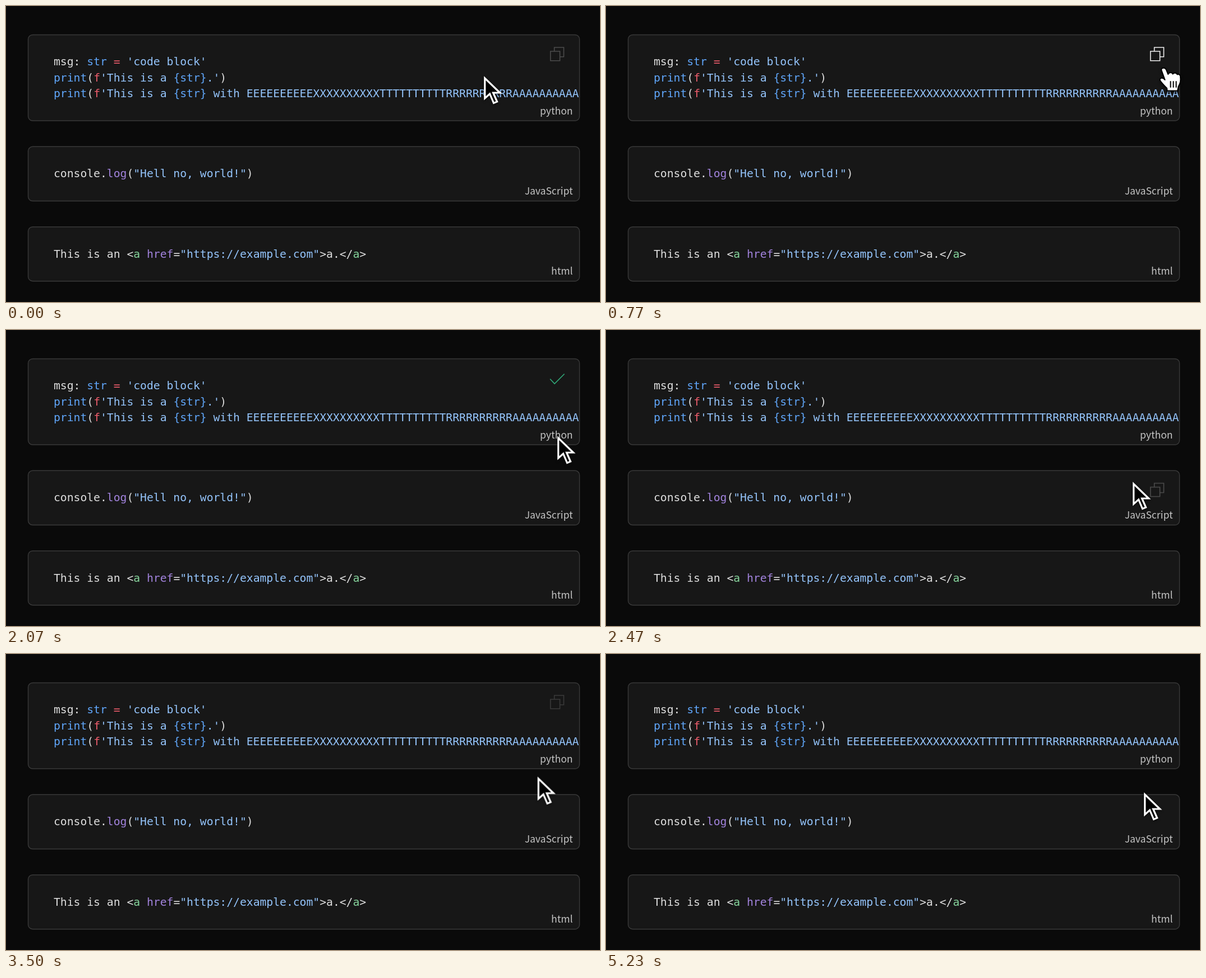
These frames come from a looping animation (1059x529 px, 5260 ms). An HTML page:

```html
<!DOCTYPE html>
<html lang="en">
<head>
<meta charset="utf-8">
<title>Code blocks with copy buttons</title>
<style>
  html, body { margin: 0; width: 100%; height: 100%; overflow: hidden; background: #0a0a0a; }
  svg { display: block; width: 1059px; height: 529px; }

  .block { fill: #171717; stroke: #393939; stroke-width: 1.4; }
  .code { font: 19.7px "DejaVu Sans Mono", monospace; fill: #dedede; white-space: pre; }
  .lang { font: 300 17.5px "Noto Sans CJK JP", "Noto Sans CJK", "Noto Sans", sans-serif; fill: #c4c4c4; text-anchor: end; }
  .fn { fill: #60a6fa; }
  .kw { fill: #ee5d6c; }
  .str { fill: #94c4fb; }
  .attr { fill: #a283dd; }
  .tag { fill: #86d49c; }

  .icon { fill: none; stroke: #4c4c4c; stroke-width: 1.6; }
  .check { stroke: #30a878; }
  .arrow { fill: #000; stroke: #fff; stroke-width: 3.2; }
  .hand { fill: #fff; stroke: #000; stroke-width: 2; stroke-linejoin: round; stroke-linecap: round; }
  .cursor { filter: drop-shadow(0 2px 2px rgba(0, 0, 0, .5)); }

  .cursor, .arrow, .hand, .copy1, .copy2, .check { animation: 5260ms linear infinite; }
  .cursor { animation-name: move; }
  .arrow { animation-name: arrow; }
  .hand { animation-name: hand; }
  .copy1 { animation-name: copy1, hover; }
  .copy2 { animation-name: copy2; }
  .check { animation-name: check; }

  @keyframes move {
    0%, 1.5% { transform: translate(852px, 125px); animation-timing-function: ease-in-out; }
    12%, 33.8% { transform: translate(993px, 110px); animation-timing-function: ease-in; }
    40.3% { transform: translate(980px, 212px); animation-timing-function: ease-out; }
    46.6%, 48.4% { transform: translate(939px, 271px); animation-timing-function: ease-in-out; }
    56.8%, 60.5% { transform: translate(905px, 114px); animation-timing-function: ease-in-out; }
    69.4%, 100% { transform: translate(959px, 247px); }
  }
  @keyframes arrow {
    0%, 11.2% { opacity: 1; }
    11.21%, 34.4% { opacity: 0; }
    34.41%, 100% { opacity: 1; }
  }
  @keyframes hand {
    0%, 11.2% { opacity: 0; }
    11.21%, 34.4% { opacity: 1; }
    34.41%, 100% { opacity: 0; }
  }
  @keyframes hover {
    0%, 11.2% { stroke: #4c4c4c; }
    13.6%, 34.4% { stroke: #ededed; }
    36.5%, 100% { stroke: #4c4c4c; }
  }
  @keyframes copy1 {
    0%, 23.8% { opacity: 1; }
    23.81%, 60.6% { opacity: 0; }
    60.61%, 65.6% { opacity: 1; }
    68.4%, 100% { opacity: 0; }
  }
  @keyframes check {
    0%, 23.8% { opacity: 0; }
    23.81%, 40.9% { opacity: 1; }
    43.7%, 51.7% { opacity: 0; }
    54.5%, 60.6% { opacity: 1; }
    60.61%, 100% { opacity: 0; }
  }
  @keyframes copy2 {
    0%, 43.7% { opacity: 0; }
    46.2%, 50.2% { opacity: 1; }
    53%, 100% { opacity: 0; }
  }
</style>
</head>
<body>
<svg viewBox="0 0 1059 529">
  <defs>
    <path id="copy" d="M970.7 81H987.5V97.8H970.7ZM977.6 81V74H994.4V90.8H987.5"/>
  </defs>

  <rect class="block" x="39.5" y="51.5" width="983" height="153.5" rx="8"/>
  <rect class="block" x="39.5" y="251.3" width="983" height="97.2" rx="8"/>
  <rect class="block" x="39.5" y="394.7" width="983" height="97" rx="8"/>

  <g class="code">
    <text x="85" y="106.4">msg: <tspan class="fn">str</tspan> <tspan class="kw">=</tspan> <tspan class="str">'code block'</tspan></text>
    <text x="85" y="134.6"><tspan class="fn">print</tspan>(<tspan class="kw">f</tspan><tspan class="str">'This is a </tspan><tspan class="fn">{str}</tspan><tspan class="str">.'</tspan>)</text>
    <text x="85" y="162.8"><tspan class="fn">print</tspan>(<tspan class="kw">f</tspan><tspan class="str">'This is a </tspan><tspan class="fn">{str}</tspan><tspan class="str"> with EEEEEEEEEEXXXXXXXXXXTTTTTTTTTTRRRRRRRRRRAAAAAAAAAA</tspan></text>
    <text x="85" y="306.2">console.<tspan class="attr">log</tspan>(<tspan class="str">"Hell no, world!"</tspan>)</text>
    <text x="85" y="449.6">This is an &lt;<tspan class="tag">a</tspan> <tspan class="attr">href</tspan>=<tspan class="str">"https://example.com"</tspan>&gt;a.&lt;/<tspan class="tag">a</tspan>&gt;</text>
  </g>

  <g class="lang">
    <text x="1010.5" y="193.6">python</text>
    <text x="1010.5" y="337">JavaScript</text>
    <text x="1010.5" y="480.4">html</text>
  </g>

  <use class="icon copy1" href="#copy"/>
  <path class="icon check" d="M970 87.5L978 96L995.5 78.5"/>
  <use class="icon copy2" href="#copy" y="199.8"/>

  <g class="cursor">
    <path class="arrow" d="M1.7 4V40L10.5 32L17.5 48.5L23.5 46L16.5 30H28.5Z"/>
    <g class="hand">
      <path d="M-2.8 4.5C-3 0 4 -1 6 4.5L9 12C11 8 16 8 17.5 11.5C20 8.5 24.5 9.5 25.5 12.5C28 11 31 13 31 16C32 24 31 28 27.5 34L26 41.5H7.5L7 37C3 33 -3 27 -5.5 22.5C-6 18 0 17.5 3.5 22Z"/>
      <path d="M13.5 25V35M18.5 25V35M23.5 25V35"/>
    </g>
  </g>
</svg>
</body>
</html>
```
